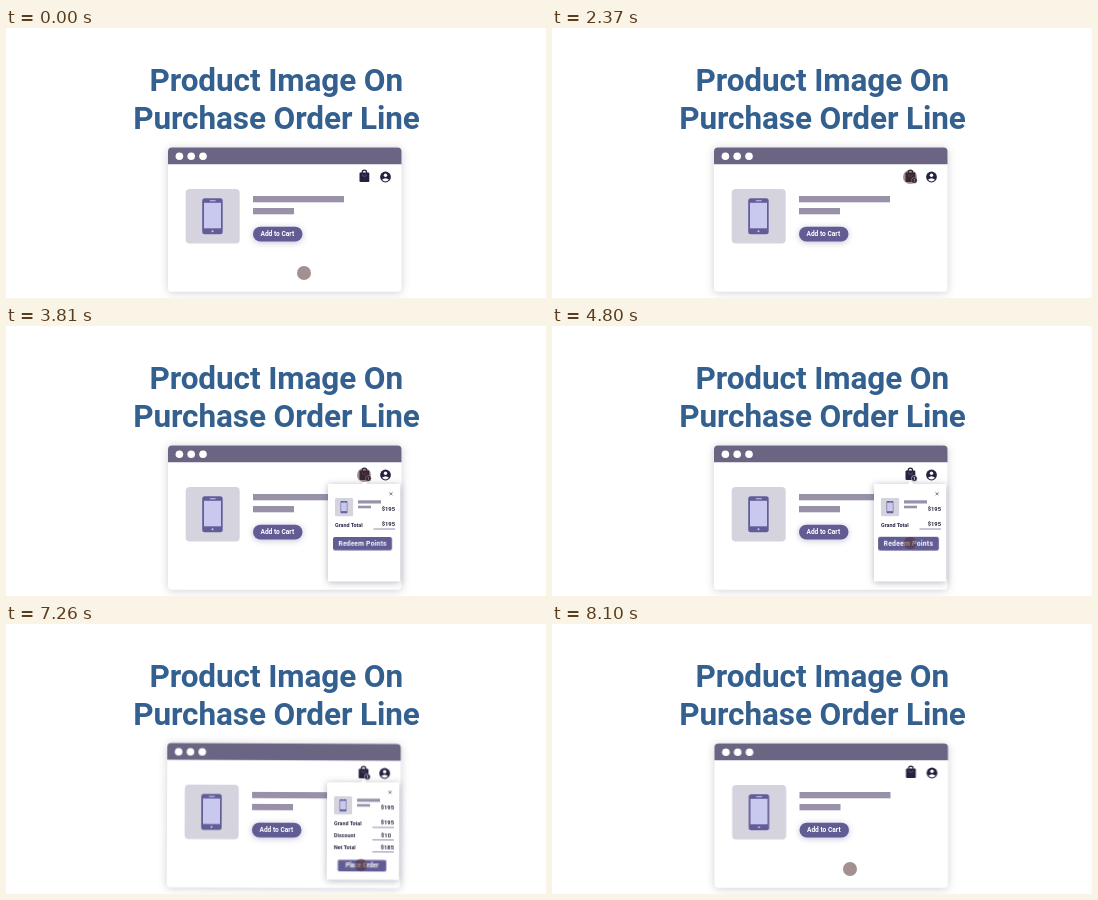
An HTML page that plays this animation: 540 by 270 pixels, repeating every 8.13 s.

```html
<!DOCTYPE html>
<html lang="en">
<head>
<meta charset="utf-8">
<title>Product Image On Purchase Order Line</title>
<style>
  html, body { margin: 0; width: 100%; height: 100%; overflow: hidden; background: #fff; }
  svg { display: block; width: 540px; height: 270px; font-family: Roboto, Inter, sans-serif; font-weight: 700; }
  .title { font-size: 31.5px; letter-spacing: -.1px; fill: #34608f; text-anchor: middle; }
  .label { fill: #fff; text-anchor: middle; }
  .row { font-size: 5.4px; fill: #292642; }
  .sum { font-size: 5.8px; fill: #292642; text-anchor: end; }
  .bar { fill: #9891a8; }
  .btn { fill: #625c94; }
  .rule { stroke: #77718f; stroke-width: .8; }
  .icon { fill: #25213f; }
  #win { filter: drop-shadow(0 1px 4px rgba(60, 55, 80, .24)); }
  #popup { filter: drop-shadow(0 1px 3.5px rgba(50, 45, 75, .36)); }
  #scene { transform-origin: 279px 192px; }
  #add { transform-origin: 271.5px 206px; filter: drop-shadow(0 1px 3px rgba(98, 92, 148, .4)); }
  #redeem { transform-origin: 356.5px 217.5px; }
  #place { transform-origin: 357px 241px; }
</style>
</head>
<body>
<svg viewBox="0 0 540 270">
  <defs>
    <g id="phone">
      <rect width="54" height="54.5" rx="4" fill="#d5d4de"/>
      <rect x="16.5" y="9.3" width="20.5" height="36" rx="2.5" fill="#625d98"/>
      <rect x="18.3" y="13.8" width="17" height="25.5" fill="#c9c9f0"/>
      <rect x="24" y="11.2" width="6" height="1" rx=".5" fill="#c9c9f0"/>
      <circle cx="26.8" cy="42.3" r="1" fill="#c9c9f0"/>
    </g>
  </defs>

  <text class="title" x="270.3" y="63">Product Image On</text>
  <text class="title" x="270.5" y="101">Purchase Order Line</text>

  <g id="scene">
    <g id="win">
      <rect x="162" y="119.5" width="233.5" height="144.2" rx="4" fill="#fff"/>
      <path d="M162 136.2V123.5a4 4 0 0 1 4-4H391.5a4 4 0 0 1 4 4V136.2Z" fill="#6b6482"/>
      <g fill="#fff">
        <circle cx="173.4" cy="128.3" r="3.8"/>
        <circle cx="185.2" cy="128.3" r="3.8"/>
        <circle cx="197" cy="128.3" r="3.8"/>
      </g>
    </g>
    <use href="#phone" x="179.7" y="161"/>
    <rect class="bar" x="247" y="168" width="91" height="6.3"/>
    <rect class="bar" x="247" y="180" width="41" height="6.3"/>
    <g id="add">
      <rect class="btn" x="247" y="198.7" width="49.5" height="14.8" rx="7.4"/>
      <text class="label" x="271.3" y="208.4" font-size="6.6">Add to Cart</text>
    </g>

    <path d="M356.2 146V144.4a2.2 2.2 0 0 1 4.4 0V146" fill="none" stroke="#25213f" stroke-width="1.2"/>
    <rect class="icon" x="353.5" y="144.4" width="9.8" height="9.5" rx="1"/>
    <path d="M356.4 146.4a2 2 0 0 0 4 0" fill="none" stroke="#77728c" stroke-width=".6"/>
    <g id="badge">
      <circle cx="362.3" cy="152.4" r="2.9" fill="#25213f" stroke="#fff" stroke-width=".5"/>
      <text class="label" x="362.3" y="153.9" font-size="4">1</text>
    </g>
    <circle class="icon" cx="379.5" cy="149" r="5.4"/>
    <circle cx="379.5" cy="147.2" r="1.7" fill="#fff"/>
    <path d="M376 151.8Q379.5 148.8 383 151.8Q379.5 155.2 376 151.8Z" fill="#fff"/>

    <g id="popup">
      <path d="M322 158H355.5L358.5 155L361.5 158H394V255.5H322Z" fill="#fff"/>
      <path d="M383.5 166.3l3 3m0-3l-3 3" stroke="#55506e" stroke-width=".8"/>
      <use href="#phone" transform="translate(329 172) scale(.335)"/>
      <rect class="bar" x="352" y="174.3" width="23" height="3.2"/>
      <rect class="bar" x="352" y="179.7" width="13" height="2.6"/>
      <text class="sum" x="389" y="185">$195</text>
      <text class="row" x="329" y="201">Grand Total</text>
      <text class="sum" x="389" y="200.3">$195</text>
      <path class="rule" d="M367.5 203H389"/>
      <g id="redeem">
        <rect class="btn" x="327" y="211" width="59" height="13.3" rx="2"/>
        <text class="label" x="356.5" y="220" font-size="6.6" letter-spacing=".25">Redeem Points</text>
      </g>
      <g id="totals">
        <text class="row" x="329" y="213.3">Discount</text>
        <text class="sum" x="386" y="212.8">$10</text>
        <path class="rule" d="M367.5 215.5H389"/>
        <text class="row" x="329" y="225.3">Net Total</text>
        <text class="sum" x="389" y="224.8">$185</text>
        <path class="rule" d="M367.5 227.5H389"/>
        <g id="place">
          <rect class="btn" x="332.5" y="235.5" width="49.5" height="11.7" rx="1.5"/>
          <text class="label" x="357.2" y="243.6" font-size="6.4">Place Order</text>
        </g>
      </g>
    </g>
  </g>

  <g id="cursor"><circle id="dot" r="7" fill="#4f2a2a" fill-opacity=".52"/></g>
</svg>
<script>
  const LOOP = 8130;

  // steps: [time in ms, value]; the last value holds to the end of the loop
  function play(id, prop, steps) {
    const frames = steps.map(([t, v]) => ({ offset: t / LOOP, [prop]: v, easing: "ease-in-out" }));
    if (steps[0][0] > 0) frames.unshift({ ...frames[0], offset: 0 });
    frames.push({ ...frames[frames.length - 1], offset: 1 });
    document.getElementById(id).animate(frames, { duration: LOOP, iterations: Infinity });
  }

  const at = (x, y) => `translate(${x}px, ${y}px)`;
  const size = s => `scale(${s})`;
  const sway = (x, deg) => `translate(${x}px, 0px) rotate(${deg}deg)`;
  const press = (t, s) => [[t - 150, size(1)], [t, size(s)], [t + 150, size(1)]];

  const home = at(298, 245), add = at(274, 207), bag = at(358, 149);
  const redeem = at(358, 217), place = at(355, 241);

  play("cursor", "transform", [
    [0, home], [300, add], [1620, add], [2190, bag], [3820, bag],
    [4100, redeem], [6000, redeem], [6300, place], [7600, place], [7600, home]
  ]);
  play("cursor", "opacity", [[7410, 1], [7600, 0], [7800, 1]]);
  play("dot", "transform", [...press(960, .85), ...press(4800, .88), ...press(7260, .88)]);

  play("add", "transform", press(960, 1.03));
  play("redeem", "transform", press(4800, 1.03));
  play("place", "transform", press(7260, .98));

  play("badge", "opacity", [[0, 0], [1100, 0], [1250, 1], [7410, 1], [7600, 0]]);
  play("popup", "opacity", [[0, 0], [2400, 0], [2700, 1], [7410, 1], [7650, 0]]);
  play("redeem", "opacity", [[4950, 1], [5130, 0]]);
  play("totals", "opacity", [[0, 0], [5010, 0], [5220, 1]]);

  play("scene", "transform", [
    [0, sway(0, 0)], [7000, sway(0, 0)], [7200, sway(-1, .25)], [7410, sway(-1, .25)], [7650, sway(.5, 0)]
  ]);
</script>
</body>
</html>
```
